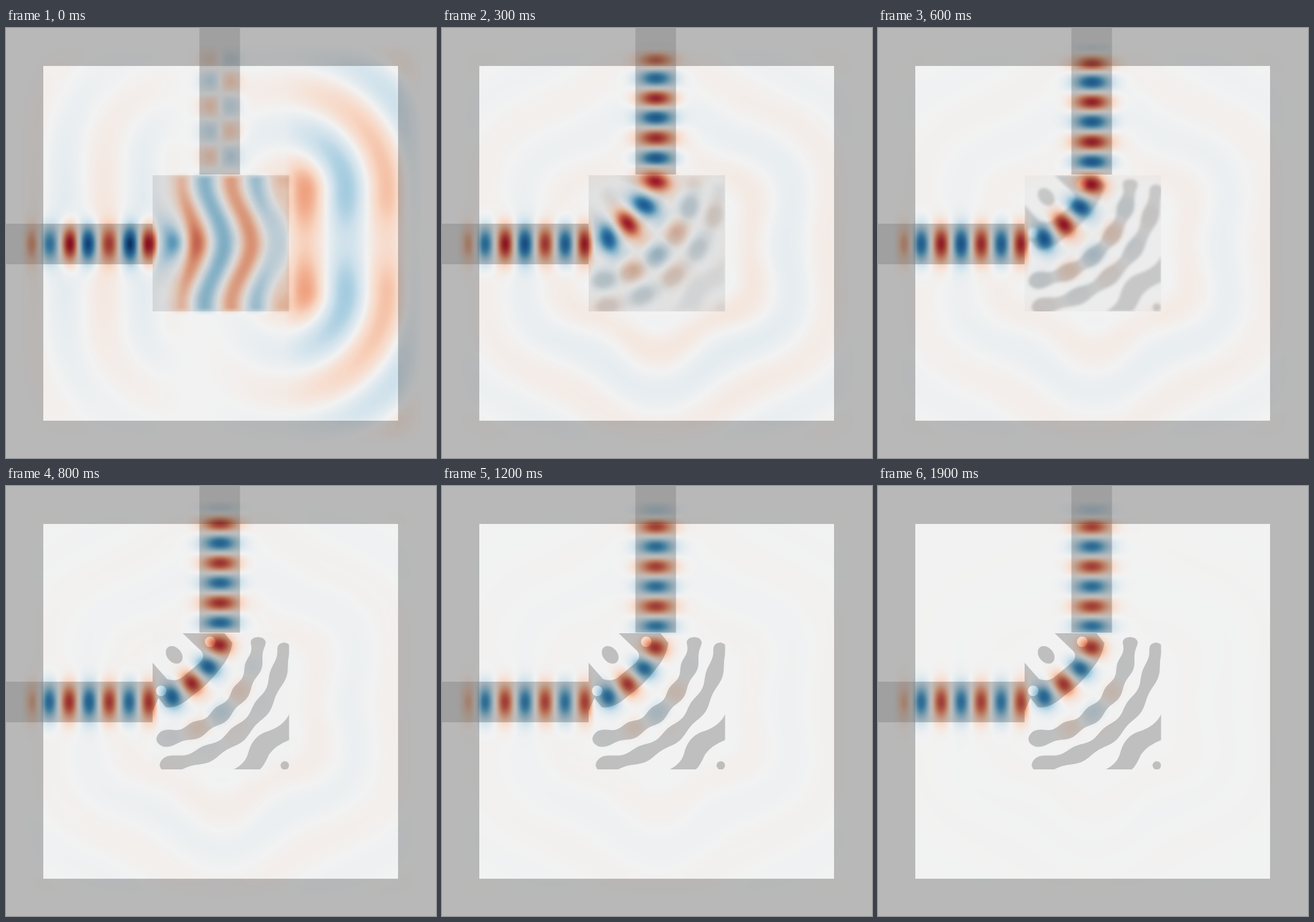
These frames come from a looping animation (657 px wide and 657 px high, 2000 ms). An HTML page with a canvas:

```html
<!DOCTYPE html>
<html lang="en">
<head>
<meta charset="utf-8">
<title>Wave bend optimisation</title>
<style>
  html, body { margin: 0; width: 100%; height: 100%; overflow: hidden; background: #b8b8b8; }
  canvas { display: block; width: 657px; height: 657px; }
</style>
</head>
<body>
<canvas id="stage" width="657" height="657"></canvas>
<script>
const SIZE = 657, CELL = 3, N = SIZE / CELL, LOOP = 2000, STEP = 100, TAU = 2 * Math.PI, DEG = TAU / 360;
const ctx = document.getElementById('stage').getContext('2d');
const { exp, cos, sin, abs, hypot, atan2, min, max, floor } = Math;
const clamp = v => min(1, max(0, v));
const lerp = (a, b, t) => a + (b - a) * t;
const smooth = (a, b, v) => { const t = clamp((v - a) / (b - a)); return t * t * (3 - 2 * t); };
const bell = v => exp(-v * v);

const ramp = ['053061', '2166ac', '4393c3', '92c5de', 'd1e5f0', 'f7f7f7',
  'fddbc7', 'f4a582', 'd6604d', 'b2182b', '67001f']
  .map(h => [0, 2, 4].map(i => parseInt(h.slice(i, i + 2), 16)));

// Everything that changes with time; the first step is the unoptimised square
function stateAt(time) {
  const first = time < STEP, age = time - STEP;
  const power = .65 + .13 * bell((time - 450) / 350);
  const output = first ? 0 : power - .08 * exp(-age / 150);
  const phase = 75 + 17.5 * smooth(100, 1200, time);
  return {
    first, output, phase,
    input: first ? .8 : power,
    beat: .25 * exp(-time / 250),
    ring: first ? 1 : .45 * exp(-age / 130),
    scatter: first ? 0 : .15 * exp(-time / 750),
    trapped: first ? 0 : .17 + .2 * exp(-age / 350),
    spread: 24 + 46 * exp(-age / 300),
    solid: smooth(0, 900, time),
    lumps: .42 * bell((time - 450) / 300),
    lobes: bendLobes(output * 1.08, phase, smooth(0, 900, time)),
  };
}

// Four alternating lobes around the bend, the later ones moving with the output phase
function bendLobes(amp, phase, solid) {
  const centres = [[254, 322], [284, 303], [309, 279], [326, 247]];
  return centres.map(([x, y], i) => ({
    x, y: y - (92.5 - phase) * i * .26,
    amp: i % 2 ? amp : -amp,
    c: cos((20 + 20 * i) * DEG), s: sin((20 + 20 * i) * DEG),
    reach: lerp(27, 20, solid),
  }));
}

function lobe(x, y, l) {
  const dx = x - l.x, dy = y - l.y;
  const u = (dx * l.c - dy * l.s) / 16, v = (dy * l.c + dx * l.s) / l.reach;
  return l.amp * exp(-u * u - v * v);
}

const guide = (along, across, beat) =>
  cos(TAU * along / 61) * bell(across / 28) * (1 - beat);
const beatAt = v => cos(TAU * v / 92);

// Waves leaving the right and left edges of the design square
function rings(x, y, strength) {
  const r = hypot(x - 425, y - min(400, max(250, y))) + .01;
  const facing = .2 + .8 * max(0, (x - 425) / r);
  const dip = x > 425 ? .55 + .45 * smooth(0, 75, abs(y - 328)) : 1;
  const right = .44 * exp(-r / 350) * facing * dip * cos(TAU * (r - 33) / 125) * smooth(290, 430, x);
  const s = hypot(x - 270, y - min(450, max(200, y)));
  const left = .08 * cos(TAU * (s - 120) / 120) * bell((y - 320) / 230) * smooth(205, 130, x - 80);
  return strength * (right + strength * left);
}

// Faint lobed halo around the square
function halo(x, y) {
  const r = hypot(x - 330, y - 330), a = atan2(y - 330, x - 330);
  const crest = 148 + 15 * cos(6 * (a - TAU / 4));
  return cos(TAU * (r - crest) / 128) * smooth(100, 155, r) * bell(r / 340) * (.7 + .3 * cos(a - 1));
}

const insideDesign = (x, y) =>
  smooth(220, 230, x) * smooth(440, 426, x) * smooth(219, 232, y) * smooth(440, 426, y);

// Standing wave on arcs around the inner corner of the square
function trappedWave(x, y, spread) {
  const r = hypot(x - 224, y - 225), a = atan2(y - 225, x - 224) / DEG;
  return -cos(Math.PI * (r - 160) / 45) * cos(Math.PI * (a - 49) / 16.5) *
    bell((r - 160) / spread) * bell((a - 49) / (spread * .9)) * smooth(115, 140, r);
}

function chevrons(x, y) {
  const dy = abs(y - 328), shift = 30 * smooth(0, 95, dy);
  const weight = max(bell(dy / 40), smooth(235, 285, x)) * (1 - .5 * smooth(370, 430, x));
  const focus = 1 + .6 * bell((x - 275) / 35) * bell(dy / 25);
  return .38 * weight * focus * cos(TAU * (x + shift - 293) / 81);
}

function sideMode(x, y) {
  const u = (x - 327) / 22;
  return .5 * u * exp(-u * u) * cos(TAU * (y - 81) / 77) * smooth(224, 212, y);
}

const fade = v => clamp((v - 22) / 38) * clamp((636 - v) / 42);

function fieldAt(x, y, s) {
  const inside = insideDesign(x, y);
  let f = s.ring * rings(x, y, s.ring) + s.scatter * halo(x, y);
  if (x < 233.75) f += s.input * guide(x - 218.5, y - 330, s.beat * beatAt(x - 65));
  if (y < s.phase + 137.25) f -= s.output * guide(y - s.phase, x - 327, s.beat * beatAt(y - 75));
  if (s.first) return (f + inside * chevrons(x, y) + sideMode(x, y)) * fade(x) * fade(y);
  if (inside) f += s.trapped * inside * trappedWave(x, y, s.spread);
  for (const l of s.lobes) f += lobe(x, y, l);
  return f * fade(x) * fade(y);
}

const disc = (x, y, rx, ry = rx, a = 0) => {
  const p = new Path2D();
  p.ellipse(x, y, rx, ry, a, 0, TAU);
  return p;
};
const polar = (r, deg) => [224 + r * cos(deg * DEG), 225 + r * sin(deg * DEG)];

// Curved band whose width swells at regular angles
function band(radius, from, to, half) {
  const p = new Path2D();
  const edge = (deg, side) => {
    const end = clamp(min(deg - from, to - deg) / 4);
    const swell = half + 2 * cos(TAU * (deg - 18) / 16);
    p.lineTo(...polar(radius + side * swell * (1 - (1 - end) ** 2) ** .5, deg));
  };
  for (let d = from; d <= to; d += .5) edge(d, 1);
  for (let d = to; d >= from; d -= .5) edge(d, -1);
  p.closePath();
  return p;
}

const core = new Path2D('M224 270L246 295Q262 300 272 290L296 270Q307 259 295 249L270 225' +
  'H334L346 240Q342 262 328 278Q308 305 284 321Q262 341 244 338L233 324L224 344Z');
core.addPath(disc(237, 313, 8));
core.addPath(disc(312, 238, 8));
const shapes = [
  core,
  disc(257, 258, 11, 15, -.7),
  band(162, 2, 88, 11),
  band(202, 4, 87, 11),
  new Path2D('M433 348V388Q412 396 402 410Q394 428 388 433H348Q366 424 370 408Q376 384 396 376Q424 368 433 348Z'),
  disc(426, 427, 6.5),
];
const lumps = [];
for (const r of [162, 202])
  for (let deg = 18; deg < 90; deg += 16) lumps.push(disc(...polar(r, deg), 12, 17, deg * DEG));

const small = document.createElement('canvas');
small.width = small.height = N;
const smallCtx = small.getContext('2d');
const pixels = smallCtx.createImageData(N, N);

function paintField(state) {
  for (let i = 0; i < N * N; i++) {
    const f = fieldAt((i % N + .5) * CELL, (floor(i / N) + .5) * CELL, state);
    const v = clamp((f + 1) / 2) * 10, j = min(9, floor(v));
    for (let c = 0; c < 3; c++) pixels.data[4 * i + c] = lerp(ramp[j][c], ramp[j + 1][c], v - j);
    pixels.data[4 * i + 3] = 255;
  }
  smallCtx.putImageData(pixels, 0, 0);
  ctx.imageSmoothingQuality = 'high';
  ctx.drawImage(small, 0, 0, SIZE, SIZE);
}

function shade(level, x, y, w, h) {
  ctx.fillStyle = `rgb(${level},${level},${level})`;
  ctx.fillRect(x, y, w, h);
}

function paintDesign({ solid, lumps: lumpy }) {
  ctx.save();
  ctx.beginPath();
  ctx.rect(224, 225, 208.5, 208);
  ctx.clip();
  ctx.globalAlpha = .45 * (1 - solid);
  shade(202, 224, 225, 209, 208);
  ctx.filter = `blur(${lerp(6, .5, solid)}px)`;
  ctx.globalAlpha = solid;
  for (const s of shapes) ctx.fill(s, 'evenodd');
  ctx.filter = 'blur(3px)';
  ctx.globalAlpha = lumpy * (1 - solid);
  for (const s of lumps) ctx.fill(s);
  ctx.restore();
}

function draw(time) {
  const state = stateAt(time);
  ctx.globalCompositeOperation = 'source-over';
  paintField(state);
  ctx.globalCompositeOperation = 'multiply';
  shade(250, 57, 58, 542, 542);
  shade(190, 0, 0, SIZE, 58);
  shade(190, 0, 600, SIZE, 57);
  shade(190, 0, 58, 57, 542);
  shade(190, 599, 58, 58, 542);
  shade(222, 0, 299, 57, 62);
  shade(222, 295.5, 0, 62, 58);
  shade(202, 57, 299, 167, 62);
  shade(202, 295.5, 58, 62, 166);
  paintDesign(state);
}

let shown = -1;
function tick() {
  const step = floor(performance.now() % LOOP / STEP);
  if (step !== shown) draw((shown = step) * STEP);
  requestAnimationFrame(tick);
}
tick();
</script>
</body>
</html>
```
